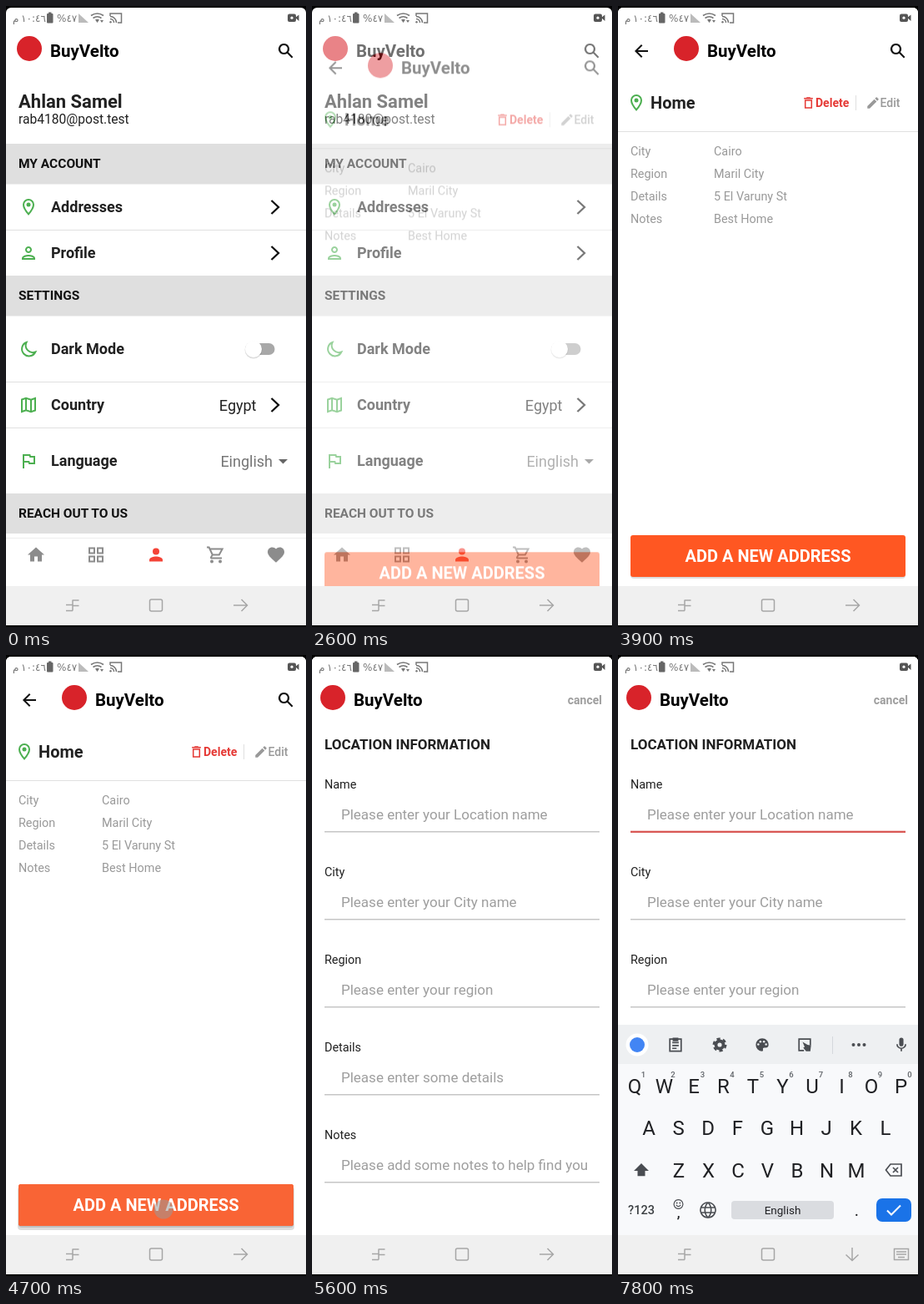
Write an HTML page that moves like this. It is 360 px wide and 744 px high and loops after 8 s.

```html
<!DOCTYPE html>
<html lang="en">
<head>
<meta charset="utf-8">
<title>Shop account</title>
<style>
  html, body { margin: 0; width: 100%; height: 100%; overflow: hidden; background: #000; }
  svg { display: block; width: 100%; height: 100%; font-family: Roboto, sans-serif; }
  .page { animation: 8s infinite both; }
  #address { animation-name: rise1, fade1; }
  #form { animation-name: rise2, fade2; }
  #press { animation: press 8s infinite both; }
  #focus { animation: focus 8s infinite both; }
  #keyboard { animation: keyboard 8s infinite both; }
  #navBack { animation: backOut 8s step-end infinite both; }
  #navDown { animation: downIn 8s step-end infinite both; }

  @keyframes rise1 {
    0%, 30.5% { transform: translateY(174px); animation-timing-function: cubic-bezier(.4, 0, .2, 1); }
    33.8%, 100% { transform: none; }
  }
  @keyframes fade1 {
    0%, 30.5% { opacity: 0; animation-timing-function: ease-in; }
    33.8%, 100% { opacity: 1; }
  }
  @keyframes rise2 {
    0%, 60.5% { transform: translateY(174px); animation-timing-function: cubic-bezier(.4, 0, .2, 1); }
    63.8%, 100% { transform: none; }
  }
  @keyframes fade2 {
    0%, 60.5% { opacity: 0; animation-timing-function: ease-in; }
    63.8%, 100% { opacity: 1; }
  }
  @keyframes press {
    0%, 58.5% { opacity: 0; }
    58.7%, 59.7% { opacity: 1; }
    61%, 100% { opacity: 0; }
  }
  @keyframes focus {
    0%, 81.25% { opacity: 0; }
    83.75%, 100% { opacity: 1; }
  }
  @keyframes keyboard {
    0%, 89.5% { transform: translateY(252px); animation-timing-function: cubic-bezier(0, 0, .2, 1); }
    92.6%, 100% { transform: none; }
  }
  @keyframes backOut { 0% { opacity: 1; } 83.75%, 100% { opacity: 0; } }
  @keyframes downIn { 0% { opacity: 0; } 83.75%, 100% { opacity: 1; } }
</style>
</head>
<body>
<svg id="stage" viewBox="0 0 360 744" preserveAspectRatio="none"></svg>
<script>
const GREEN = '#4caf50', INK = '#212121', GREY = '#999', LINE = '#e0e0e0', RED = '#e53935', KEY = '#4a4d52';
const SHOP = 'BuyVelto';

const text = (x, y, size, weight, fill, str, anchor = 'start') =>
  `<text x="${x}" y="${y}" font-size="${size}" font-weight="${weight}" fill="${fill}" text-anchor="${anchor}">${str}</text>`;
const rect = (x, y, w, h, fill, r = 0) =>
  `<rect x="${x}" y="${y}" width="${w}" height="${h}" rx="${r}" fill="${fill}"/>`;
const dot = (x, y, r, fill) => `<circle cx="${x}" cy="${y}" r="${r}" fill="${fill}"/>`;
const fillPath = (d, fill) => `<path d="${d}" fill="${fill}" fill-rule="evenodd"/>`;
const line = (d, stroke, width = 2) =>
  `<path d="${d}" fill="none" stroke="${stroke}" stroke-width="${width}"/>`;

// Icons live on a 24-unit grid and are placed by their centre.
const icons = {
  home: c => fillPath('M10 20v-6h4v6h5v-8h3L12 3 2 12h3v8z', c),
  grid: c => line('M4 4h6v6H4zM14 4h6v6h-6zM4 14h6v6H4zM14 14h6v6h-6z', c),
  person: c => dot(12, 8, 4, c) + fillPath('M12 14c-2.67 0-8 1.34-8 4v2h16v-2c0-2.66-5.33-4-8-4z', c),
  personLine: c => line('M12 5a3 3 0 1 0 .01 0zM5 19v-1c0-2 4.5-3.1 7-3.1s7 1.1 7 3.1v1z', c),
  cart: c => line('M1 3h2.6l4.2 9h8l3.8-7H4.6M7.8 12l-1.6 2.6q-.6 1.4.8 1.4h12', c) + dot(7, 20, 2, c) + dot(17, 20, 2, c),
  heart: c => fillPath('M12 21.35l-1.45-1.32C5.4 15.36 2 12.28 2 8.5 2 5.42 4.42 3 7.5 3c1.74 0 3.41.81 4.5 2.09C13.09 3.81 14.76 3 16.5 3 19.58 3 22 5.42 22 8.5c0 3.78-3.4 6.86-8.55 11.54z', c),
  search: c => line('M9.5 4a5.5 5.5 0 1 0 .01 0zM13.6 13.6l6.1 6.1', c, 2.1),
  back: c => line('M20 12H5M12.7 4.7L5.4 12l7.3 7.3', c),
  pin: c => line('M12 3a6 6 0 0 0-6 6c0 4.5 6 11.4 6 11.4S18 13.500 18 9a6 6 0 0 0-6-6z', c) + dot(12, 9, 2.5, c),
  moon: c => line('M9.500 4a8.500 8.500 0 1 0 10.800 11.500A8.500 8.500 0 0 1 9.500 4z', c),
  map: c => line('M4 5.500l5-1.700 6 2 5-1.800v14.500l-5 1.700-6-2-5 1.800zM9 4v14M15 6v14', c),
  flag: c => line('M6 21V5h7.500l.6 2H19v8h-6l-.6-2H6', c),
  trash: c => line('M7 8h10v12H7zM5 5h14M9 4h6', c),
  pencil: c => fillPath('M3 17.25V21h3.75L17.81 9.94l-3.75-3.75zM20.71 7.04a1 1 0 0 0 0-1.41l-2.34-2.34a1 1 0 0 0-1.41 0l-1.83 1.83 3.75 3.75z', c),
  chevron: c => line('M7.500 4l8.500 8-8.500 8', c, 2.300),
  clipboard: c => line('M4 4h16v17H4zM7.500 9h9M7.500 13h9M7.500 17h6', c) + rect(8, 2, 8, 5, c),
  gear: c => `<circle cx="12" cy="12" r="5.300" fill="none" stroke="${c}" stroke-width="4.500"/>
    <circle cx="12" cy="12" r="8.500" fill="none" stroke="${c}" stroke-width="3" stroke-dasharray="5 3.900"/>`,
  palette: c => fillPath('M12 3a9 9 0 0 0 0 18q2-.3 1.100-2.500-.6-2.400 1.700-2.500H17a4 4 0 0 0 4-4c0-5-4-9-9-9z', c) +
    [[6.5, 11.5], [9.5, 7.5], [14.5, 7.5], [17.5, 11.5]].map(([x, y]) => dot(x, y, 1.5, '#eef0f2')).join(''),
  sticker: c => line('M11 20H4V4h16v9', c) + fillPath('M9 8l7 4 5 1-1 8h-6l-4-5 2-1z', c),
  mic: c => rect(9, 2, 6, 12, c, 3) + line('M6 11a6 6 0 0 0 12 0M12 17v4', c),
  shift: c => fillPath('M12 3L2 13h5v7h10v-7h5z', c),
  erase: c => line('M8 5h13v14H8l-5.500-7zM11 9l6 6M17 9l-6 6', c, 1.700),
  smile: c => line('M12 3a9 9 0 1 0 .01 0zM7.500 13.500q4.500 6 9 0', c) + dot(9, 9.5, 1.5, c) + dot(15, 9.5, 1.5, c),
  globe: c => line('M12 3a9 9 0 1 0 .01 0zM12 3c-5 5-5 13 0 18c5-5 5-13 0-18M4 9h16M4 15h16', c, 1.600),
};
const icon = (name, cx, cy, color, scale = 1) =>
  `<g transform="translate(${cx - 12 * scale} ${cy - 12 * scale}) scale(${scale})">${icons[name](color)}</g>`;

const brand = (x, y) => dot(x, y, 15, '#d8232a') + text(x + 25, y + 9.5, 20.5, 700, '#000', SHOP);
const whitePage = rect(0, 2, 360, 700, '#fff', 6);

function accountPage() {
  const bands = [[165, 'MY ACCOUNT'], [323, 'SETTINGS'], [584, 'REACH OUT TO US']];
  const rows = [['pin', 241, 'Addresses'], ['personLine', 296, 'Profile'], ['moon', 411, 'Dark Mode'],
    ['map', 478, 'Country'], ['flag', 545, 'Language']];
  const tabs = ['home', 'grid', 'person', 'cart', 'heart'];
  return whitePage + brand(28, 51) + icon('search', 336, 54, '#111') +
    text(15, 122, 22, 700, INK, 'Ahlan Samel') + text(15, 141, 15.6, 400, INK, 'rab4180@post.test') +
    bands.map(([y, s]) => rect(0, y, 360, 48.5, '#dfdfdf') + text(15, y + 29, 15.5, 700, '#111', s)).join('') +
    [268, 450, 505].map(y => rect(0, y, 360, 1, LINE)).join('') +
    rows.map(([name, y, s]) => icon(name, 27, y, GREEN) + text(54, y + 6, 18, 700, INK, s)).join('') +
    [241, 296, 478].map(y => icon('chevron', 323, y, '#111')).join('') +
    rect(294, 404, 28.5, 14, '#a8a8a8', 7) + dot(297, 412, 10.5, '#0002') + dot(297, 411, 10, '#fff') +
    text(300.5, 484.5, 18, 400, INK, 'Egypt', 'end') + text(320, 551.5, 18, 400, '#757575', 'Einglish', 'end') +
    fillPath('M327 543h11l-5.500 5.500z', '#666') +
    rect(0, 632, 360, 64, '#fff') + rect(0, 637, 360, 1, '#eee') +
    tabs.map((name, i) => icon(name, 36 + 72 * i, 657.5, i === 2 ? '#f44336' : '#8c8c8c')).join('');
}

function addressPage() {
  const facts = [['City', 'Cairo'], ['Region', 'Maril City'], ['Details', '5 El Varuny St'], ['Notes', 'Best Home']];
  const label = text(180, 666, 20, 700, '#fff', 'ADD A NEW ADDRESS', 'middle');
  return whitePage + icon('back', 28, 54, '#111') + brand(82, 51) + icon('search', 336, 54, '#111') +
    icon('pin', 22, 116, GREEN) + text(39, 123, 20, 700, INK, 'Home') +
    icon('trash', 228.5, 116, RED, .76) + text(237, 121, 14, 700, RED, 'Delete') + rect(285, 107, 1, 18, LINE) +
    icon('pencil', 306, 116, GREY, .75) + text(314.5, 121, 14, 500, GREY, 'Edit') + rect(0, 150, 360, 1, LINE) +
    facts.map(([k, v], i) => text(15, 179 + 27 * i, 14.4, 400, GREY, k) + text(115, 179 + 27 * i, 14.4, 400, GREY, v)).join('') +
    rect(15, 635.5, 330, 50.5, '#0002', 4) + rect(15, 634, 330, 50, '#ff5722', 3) +
    `<g id="press">${rect(14, 637, 332, 52, '#0002', 4)}${rect(15, 634, 330, 50, '#f96435', 3)}</g>` + label;
}

function formPage() {
  const fields = [['Name', 'enter your Location name'], ['City', 'enter your City name'], ['Region', 'enter your region'],
    ['Details', 'enter some details'], ['Notes', 'add some notes to help find you']];
  return whitePage + brand(25, 51) + text(348, 59, 14, 700, '#9e9e9e', 'cancel', 'end') +
    text(15, 113, 17, 700, INK, 'LOCATION INFORMATION') +
    fields.map(([name, hint], i) => {
      const y = 105 * i;
      return text(15, 160 + y, 14.4, 400, INK, name) + text(35, 197 + y, 17, 400, '#9e9e9e', 'Please ' + hint) +
        rect(15, 211 + y, 330, 1.5, '#c6c6c6');
    }).join('') +
    `<g id="focus">${rect(15, 210.7, 330, 2.2, '#d9534f')}</g>`;
}

function keyboard() {
  const keys = (str, x0, y) => [...str].map((c, i) => text(x0 + 35.5 * i, y, 24, 400, '#202124', c, 'middle')).join('');
  const tools = [['clipboard', 69], ['gear', 122], ['palette', 173], ['sticker', 224], ['mic', 340]];
  return rect(0, 443, 360, 253, '#f8f9fb') + rect(0, 443, 360, 47, '#eef0f2') +
    dot(23, 467, 13.5, '#fff') + dot(23, 467, 9, '#4285f4') +
    tools.map(([name, x]) => icon(name, x, 467, KEY, .85)).join('') +
    rect(257, 457, 1, 21, '#d5d8dc') + [282.5, 289, 295.5].map(x => dot(x, 467, 2, KEY)).join('') +
    keys('QWERTYUIOP', 20, 525) + keys('ASDFGHJKL', 37, 575) + keys('ZXCVBNM', 73, 626) +
    [...'1234567890'].map((c, i) => text(30.5 + 35.5 * i, 506, 9.5, 500, '#5f6368', c, 'middle')).join('') +
    icon('shift', 28, 617, KEY, .9) + icon('erase', 331, 617, KEY) +
    text(28, 670, 14.5, 500, '#3c4043', '?123', 'middle') +
    icon('smile', 72.5, 658, KEY, .6) + text(72.5, 674, 17, 500, '#202124', ',', 'middle') +
    icon('globe', 108, 665, KEY) + rect(136, 654, 123, 22, '#dadce0', 4) +
    text(197.5, 670, 13.5, 400, '#202124', 'English', 'middle') + text(286.5, 672, 20, 400, '#202124', '.', 'middle') +
    rect(310, 651, 42, 28, '#1a73e8', 7) + line('M323 665.500l5 5 11-11', '#fff');
}

function statusBar() {
  const c = '#777';
  const arabic = (x, s) => `<text x="${x}" y="19" font-size="12" fill="${c}" font-family="DejaVu Sans, sans-serif">${s}</text>`;
  return arabic(8, 'م') + arabic(18, '١٠:٤٦') + arabic(61, '%٤٧') +
    rect(49, 9, 7.5, 11.5, '#666', 1) + rect(51, 7.5, 3.5, 2, '#666') +
    fillPath('M87 9v11h12z', '#bbb') +
    line('M102 11.500q7.500-5 15 0M104.500 14.500q5-3.500 10 0', c, 1.700) + fillPath('M107 16.500q2.500-1.500 5 0l-2.500 3.500zM113 17h4l-2 3z', c) +
    line('M125 12V9h13.500v11H134M125 15.500a4.500 4.500 0 0 1 4.500 4.500M125 12.500a7.500 7.500 0 0 1 7.500 7.500', c, 1.500) +
    dot(125.5, 19.3, 1.2, c) + rect(338, 9.5, 10, 9.5, '#555', 2) + dot(343, 14.2, 1.6, '#fff') + fillPath('M347 14l4.500-3.500v7.500z', '#555');
}

function systemBar() {
  const c = '#a6a6a6';
  const stroke = d => line(d, c, 1.5);
  return rect(0, 695, 360, 47, '#f0f0f0') + rect(0, 742, 360, 2, '#000') +
    stroke('M80 712h7.500M80 711.500v6H72M72 724.500h8M87.500 718.500H80v6') +
    stroke('M174.500 711h11q2 0 2 2v10q0 2-2 2h-11q-2 0-2-2v-10q0-2 2-2z') +
    `<g id="navBack">${stroke('M273 718h16.500M282.500 711l7 7-7 7')}</g>` +
    `<g id="navDown">${stroke('M281 710v15.500M273.500 718.500l7.500 7 7.500-7')}${stroke('M331.500 711.500h17v13h-17zM334 715h12M334 718h12M336 721.500h8')}</g>`;
}

const group = (id, cls, body) => `<g id="${id}" class="${cls}">${body}</g>`;
document.getElementById('stage').innerHTML =
  accountPage() + group('address', 'page', addressPage()) +
  `<g style="animation:press 8s infinite both">${dot(189, 664, 11.5, '#9998')}</g>` +
  group('form', 'page', formPage()) + group('keyboard', '', keyboard()) +
  statusBar() + systemBar() + rect(0, 0, 360, 2, '#000');
</script>
</body>
</html>
```
